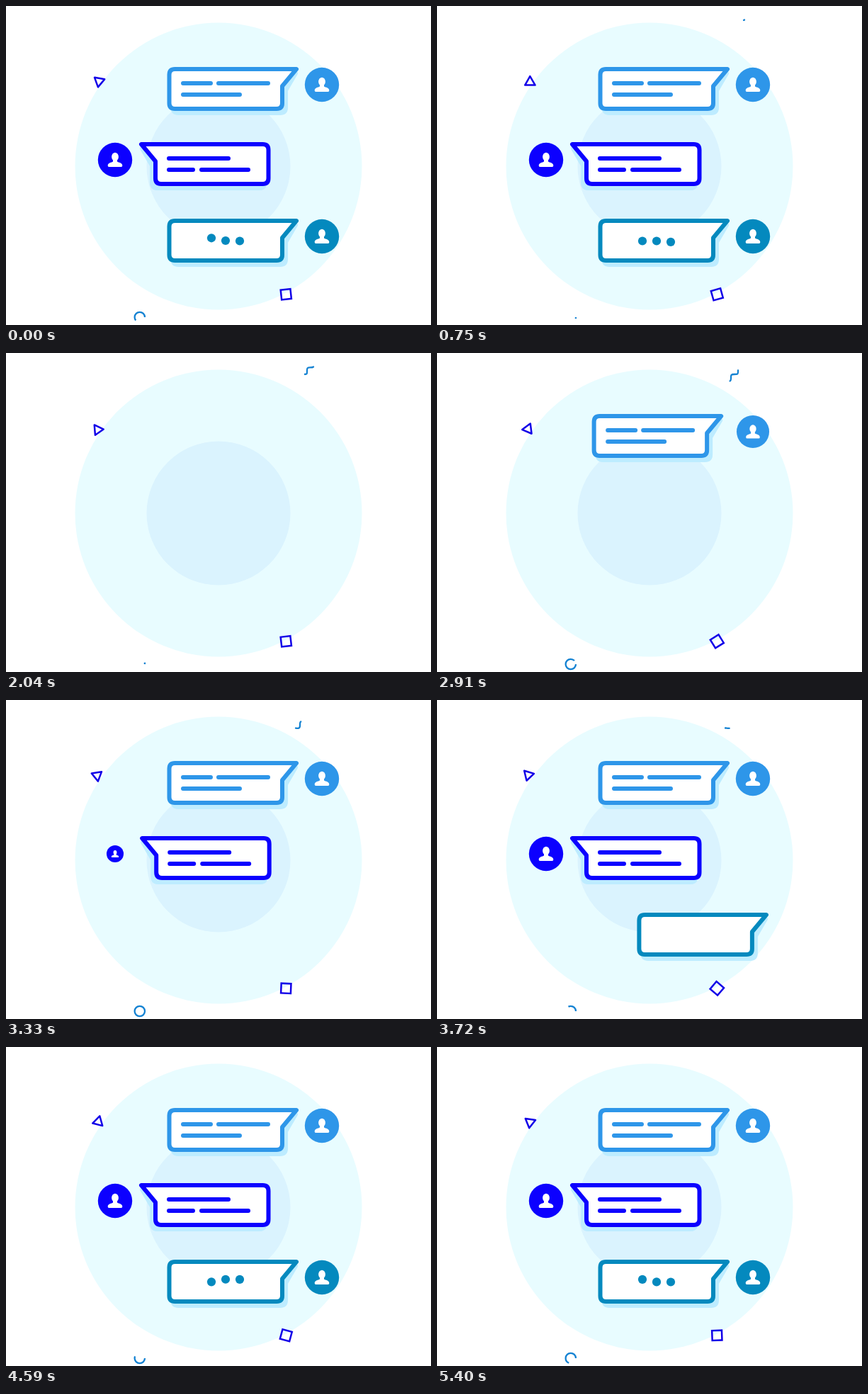
Write an HTML page that moves like this. It is 600 by 450 pixels and loops after 5.43 s.

```html
<!DOCTYPE html>
<html lang="en">
<head>
<meta charset="utf-8">
<title>Chat</title>
<style>
  html, body { margin: 0; width: 100%; height: 100%; overflow: hidden; background: #fff; }
  svg { display: block; width: 600px; height: 450px; }
  .line { fill: none; stroke-linecap: round; stroke-linejoin: round; }
</style>
</head>
<body>
<svg viewBox="0 0 600 450">
  <defs>
    <path id="bubble" d="M410 89H238.500Q230.500 89 230.500 97V137Q230.500 145 238.500 145H382Q390 145 390 137V113Z"/>
    <path id="shadow" d="M404 89H238.500Q230.500 89 230.500 97V137Q230.500 145 238.500 145H382Q390 145 390 137V113Z"/>
    <g id="person" fill="#fff">
      <ellipse cy="-4.200" rx="4.900" ry="6"/>
      <path d="M-3-1H3V2.500C5 4 10.300 3.800 10.300 8.300Q10.300 10 8.600 10H-8.600Q-10.300 10-10.300 8.300C-10.300 3.800-5 4-3 2.500Z"/>
    </g>
  </defs>
  <circle cx="300" cy="226" r="202.500" fill="#e8fcff"/>
  <circle cx="300" cy="226" r="101.500" fill="#daf3fe"/>
  <g id="chat"></g>
  <g class="line" stroke="#1200e8" stroke-width="2.500">
    <path id="triangle" d="M8.300 0L-4.150 7.200V-7.200Z"/>
    <path id="square" stroke-linejoin="miter" d="M-6.900-6.900H6.900V6.900H-6.900Z"/>
  </g>
  <g class="line" stroke="#1482d2" stroke-width="2.300">
    <circle id="ring" cx="188.800" cy="439" r="7.200" pathLength="1" stroke-linecap="butt"/>
    <path id="squiggle" pathLength="1" d="M434 19.500C431 22 425 18 425 24S425.500 30 420 30S415 31 415 36S412 40 407 39.500"/>
  </g>
</svg>
<script>
const LOOP = 5430;
const $ = id => document.getElementById(id);
const set = (el, name, value) => el.setAttribute(name, value);

// Eased interpolation through [time, value] keys
function track(t, keys) {
  if (t <= keys[0][0]) return keys[0][1];
  for (let i = 1; i < keys.length; i++) {
    const [t0, a] = keys[i - 1], [t1, b] = keys[i];
    if (t < t1) return a + (b - a) * (1 - Math.cos(Math.PI * (t - t0) / (t1 - t0))) / 2;
  }
  return keys[keys.length - 1][1];
}

const messages = [
  { color: '#2e96e9', dy: 0, side: 1, start: 2700, lines: 'M250 109H289M300 109H370M250 125H330' },
  { color: '#0c00ff', dy: 106, side: -1, start: 3165, lines: 'M230 215H314M230 231H264M276 231H342' },
  { color: '#0489be', dy: 214, side: 1, start: 3630, lines: '' }
];

$('chat').innerHTML = messages.map(({ color, dy, side, lines }) => `
  <g class="bubble">
    <g transform="translate(${side > 0 ? 0 : 601} ${dy}) scale(${side} 1)" stroke-width="6" stroke-linejoin="round">
      <use href="#shadow" x="5" y="6" fill="#bdecff" stroke="#bdecff"/>
      <use href="#bubble" fill="#fff" stroke="${color}"/>
    </g>
    <path class="line" d="${lines}" stroke="${color}" stroke-width="6"/>
  </g>
  <g class="avatar"><circle r="24.200" fill="${color}"/><use href="#person"/></g>`).join('') +
  [290, 310, 330].map(x => `<circle class="dot" cx="${x}" fill="#0489be"/>`).join('');

const bubbles = document.querySelectorAll('.bubble');
const avatars = document.querySelectorAll('.avatar');
const dots = document.querySelectorAll('.dot');

function trim(el, from, to) {
  const shown = to - from > 0.001;
  set(el, 'visibility', shown ? 'visible' : 'hidden');
  set(el, 'stroke-dasharray', `${Math.max(to - from, 0)} 2`);
  set(el, 'stroke-dashoffset', -from);
}

function drawChat(t) {
  // The conversation spans the loop seam, so its clock starts after it clears
  const now = t < 2000 ? t + LOOP : t;
  set($('chat'), 'opacity', track(now, [[LOOP + 1600, 1], [LOOP + 1900, 0]]));

  messages.forEach(({ dy, side, start }, i) => {
    const age = now - start;
    const x = side * track(age, [[0, 103], [200, -9], [340, 0]]);
    const size = track(age, [[100, 0], [235, 1.03], [330, 1]]);
    set(bubbles[i], 'visibility', age < 0 ? 'hidden' : 'visible');
    set(bubbles[i], 'transform', `translate(${x} 0)`);
    set(avatars[i], 'transform', `translate(${300 + side * 146} ${111 + dy}) scale(${size})`);
  });

  dots.forEach((dot, i) => {
    const age = now - 4120 - i * 150;
    const hop = age < 0 ? 0 : track(age % 1110, [[0, 0], [240, -4.5], [600, 1.6], [790, 0]]);
    set(dot, 'cy', 331.5 + hop);
    set(dot, 'r', track(now, [[3850, 0], [4000, 6.1]]));
  });
}

function drawShapes(t) {
  const turn = t / LOOP * 360;
  set($('triangle'), 'transform', `translate(130 106.800) rotate(${turn}) translate(1.360 -.630) rotate(100)`);
  set($('square'), 'transform', `translate(395.300 406.800) rotate(${-6 - 2 * turn})`);

  const cycle = LOOP / 3;
  const phase = (t - 675 + LOOP) % cycle;
  trim($('ring'), track(phase, [[902, 0], [1447, 1]]), track(phase, [[0, 0], [550, 1]]));
  trim($('squiggle'), track(t, [[2200, 0], [4200, 1]]), track(t, [[400, 0], [3800, 1]]));
}

const begin = performance.now();
function frame() {
  const t = (performance.now() - begin) % LOOP;
  drawChat(t);
  drawShapes(t);
  requestAnimationFrame(frame);
}
frame();
</script>
</body>
</html>
```
